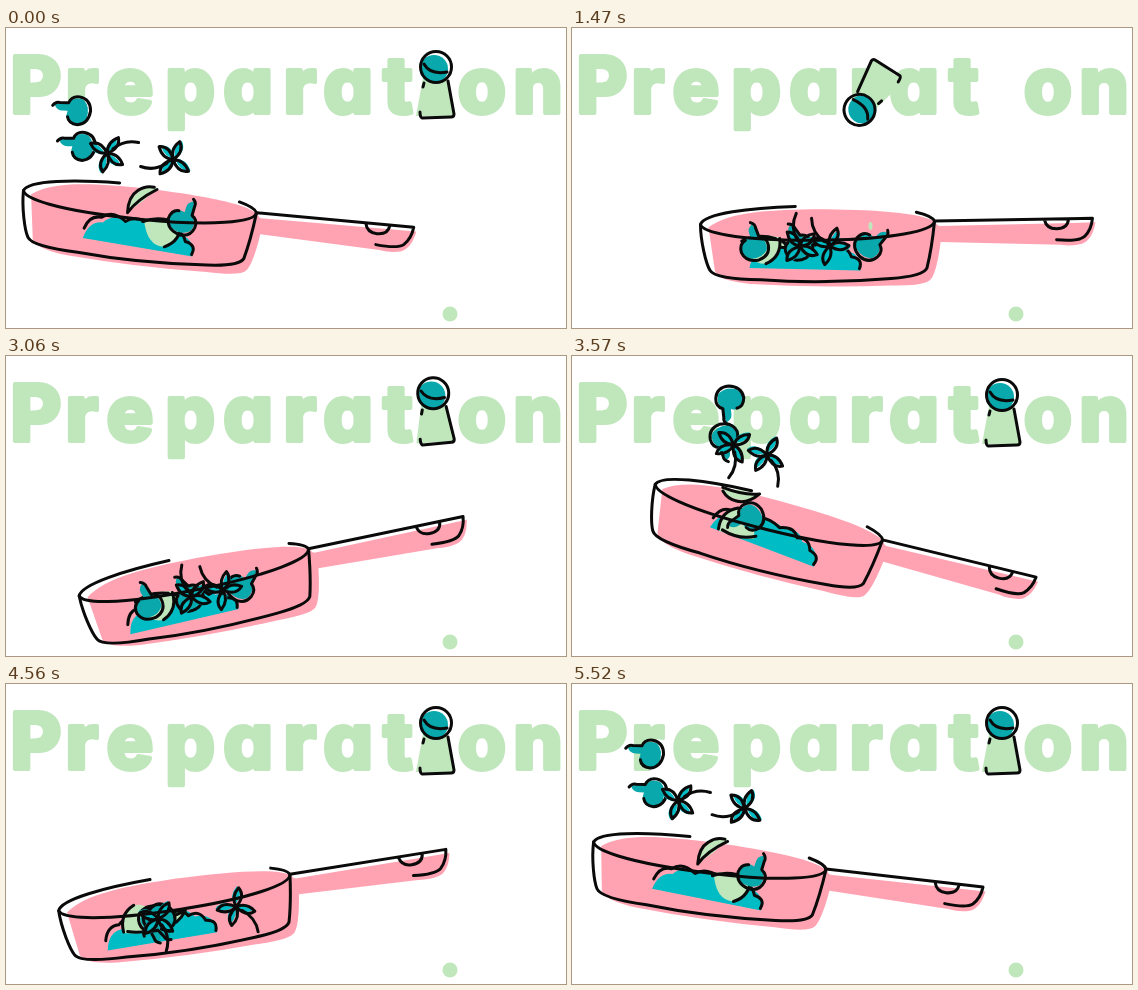
Recreate the animation shown at these times as an HTML page. Size 560x300 px, loop 5.55 s.

```html
<!DOCTYPE html>
<html lang="en">
<head>
<meta charset="utf-8">
<title>Preparation</title>
<style>
  html, body { margin: 0; width: 100%; height: 100%; overflow: hidden; background: #fff; }
  svg { display: block; width: 560px; height: 300px; }
  text {
    font: 800 78px Inter, sans-serif; font-feature-settings: "cv11";
    text-anchor: middle; fill: #c0e6bc; stroke: #c0e6bc; stroke-width: 4; stroke-linejoin: round;
  }
  .ink { fill: none; stroke: #0a0a0a; stroke-width: 3; stroke-linecap: round; stroke-linejoin: round; }
  .pink { fill: #ffa3b3; }
  .green { fill: #c0e6bc; }
  .teal { fill: #08a8ac; }
  .leaf { fill: #00bcc4; }
</style>
</head>
<body>
<svg viewBox="0 0 560 300">
  <defs>
    <g id="mushroom">
      <path class="teal" d="M-22-6Q-20 0-14 0L-9 0Q-12 8-6 13Q5 15 10 8Q14-4 7-11Q-3-15-8-7L-14-8Z"/>
      <path class="ink" d="M-24-5Q-21-9-17-8L-8-8Q-5-15 3-14Q14-12 14 0Q12 13 1 14Q-8 13-9 6"/>
    </g>
    <path id="petal" d="M0 0Q8-8 19-3Q13 6 0 0"/>
    <g id="petals">
      <use href="#petal" transform="rotate(-42)"/><use href="#petal" transform="rotate(48)"/>
      <use href="#petal" transform="rotate(115)"/><use href="#petal" transform="rotate(222)"/>
    </g>
    <g id="flower">
      <use href="#petals" class="leaf" transform="translate(-2 1)"/>
      <use href="#petals" class="ink"/>
      <path class="ink" d="M6-4Q18-13 32-9"/>
    </g>
    <g id="slice">
      <path class="green" d="M-13 16Q-12-10 14-13Q7-4 2 2Q-4 7-13 16Z"/>
      <path class="ink" d="M11-12Q2-13-5-7Q-14 0-13 16Q-5 2 14-10"/>
    </g>
    <g id="half">
      <path class="green" d="M-19-9Q0-14 18-9Q20 10 4 17Q-14 18-19-9Z"/>
      <path class="ink" d="M-20-6Q-4-14 14-8M4 17Q20 10 18-8"/>
    </g>
  </defs>

  <text y="85" x="30 76 124 184 242 294 342 392 476 532">Preparaton</text>
  <circle class="green" cx="444" cy="286" r="7.5"/>

  <g id="pan">
    <path class="pink" d="M8 4C30-12 70-13 121-13C175-12 232-8 237 4L239 5L395 3Q392 20 382 24Q372 27 360 25L240 21Q236 50 230 58Q225 65 190 64Q120 66 50 61Q18 58 14 48Z"/>
    <g id="food">
      <g id="lettuce">
        <path class="leaf" d="M-56 8Q-52-10-38-10Q-30-20-14-14Q0-22 14-14Q30-20 36-8Q56-8 55 12Z"/>
        <path class="ink" d="M-56-2Q-52-16-40-15Q-30-24-16-14Q-6-22 10-14Q24-20 30-10Q42-14 46-2Q58 0 54 10"/>
      </g>
    </g>
    <g class="ink">
      <path d="M95-16C50-15 4-10 0 1C2 8 30 18 121 18C190 18 234 10 234 0Q232-5 216-9"/>
      <path d="M0 1C0 18 5 40 9 47Q14 56 60 57Q120 62 190 57Q222 55 226 47Q231 28 234 1"/>
      <path d="M234 0L392-1Q391 10 384 17Q378 22 356 20M344 0Q346 9 356 9Q367 9 368 0"/>
    </g>
  </g>

  <ellipse id="drop" class="green" rx="2" ry="4"/>
  <g id="shaker">
    <path class="green" d="M-13 11L11 11L18 49L-20 49Z"/>
    <circle class="teal" cx="-2" cy="2" r="14"/>
    <g class="ink">
      <circle r="15.5"/>
      <path d="M-12-3Q-6 8 11 5M12 14L18 47Q18 50 15 50L-14 51Q-16 50-16 45M-12 16L-13 20"/>
    </g>
  </g>
</svg>
<script>
const LOOP = 5550, STEP = 30;
const POUR_START = 870, POUR_END = 2130, SHAKE = 210;
const DIP = 3060, REDIP = 4640, THROWN = 5520;

const $ = id => document.getElementById(id);
const clamp = (v, low, high) => Math.min(high, Math.max(low, v));
const mix = (a, b, u) => a + (b - a) * u;
const ease = (t, from, to) => {
  const u = clamp((t - from) / (to - from), 0, 1);
  return u * u * (3 - 2 * u);
};
const mod = t => ((t % LOOP) + LOOP) % LOOP;

// Smooth periodic curve through [time, values] keys, without overshoot.
function track(keys, t) {
  const n = keys.length;
  const time = i => keys[(i + n) % n][0] + Math.floor(i / n) * LOOP;
  const next = keys.findIndex(key => key[0] > t);
  const i = (next < 0 ? n : next) - 1;
  const span = time(i + 1) - time(i), u = (t - time(i)) / span, w = 1 - u;
  return keys[0][1].map((_, c) => {
    const value = k => keys[(k + n) % n][1][c];
    const slope = k => (value(k + 1) - value(k)) / (time(k + 1) - time(k));
    const tangent = k => {
      const a = slope(k - 1), b = slope(k);
      return a * b > 0 ? 2 * a * b / (a + b) : 0;
    };
    return value(i) * w * w * (1 + 2 * u) + value(i + 1) * u * u * (3 - 2 * u)
      + span * u * w * (tangent(i) * w - tangent(i + 1) * u);
  });
}

function place(node, x, y, angle) {
  node.setAttribute("transform", `translate(${x.toFixed(2)} ${y.toFixed(2)}) rotate(${angle.toFixed(2)})`);
}

const tosses = [
  { launch: 3440, apex: 3700, land: 4110 },
  { launch: 5010, apex: 5270, land: 5780 }
];

// Pan poses: left rim x, y and tilt.
const pose = {
  home: [9.5, 187, -1], pour: [127, 197.5, -1.1], poured: [129, 193, 0],
  dip: [73, 239, -11.4], windup: [45, 240, -12], fling: [84, 86.5, 23.4],
  level: [83, 168, 4.6], away: [21.7, 157, 6.9]
};
const panKeys = [
  [90, pose.home], [POUR_START, pose.pour], [POUR_END, pose.poured], [2280, pose.poured],
  [DIP, pose.dip], [3160, pose.dip],
  [tosses[0].launch, pose.fling], [tosses[0].apex, pose.level], [tosses[0].land, pose.level],
  [4740, pose.windup], [tosses[1].launch, pose.fling], [5200, pose.level], [THROWN, pose.away]
];

// Pan-local: x at rest, in the second throw (flyX) and after the first (landX).
// apex is the top of a throw; angle is the pose in the air, tumble the turn until rest.
const foods = [
  { shape: "slice", x: 62, flyX: 119, landX: 105, apex: -15, angle: 0, tumble: 40 },
  { shape: "half", x: 54, flyX: 142, landX: 79, apex: 27, angle: 0, tumble: 0 },
  { shape: "mushroom", x: 46, flyX: 45, landX: 92, apex: -130, angle: -5, tumble: 75 },
  { shape: "mushroom", x: 87, flyX: 53, landX: 97, apex: -80, angle: -5, tumble: 60 },
  { shape: "mushroom", x: 160, flyX: 161, landX: 100, apex: 12, angle: 100, tumble: 30 },
  { shape: "flower", x: 90, flyX: 79, landX: 97, apex: -74, angle: -5, tumble: -75 },
  { shape: "flower", x: 122, flyX: 146, landX: 176, apex: -74, angle: 178, tumble: 75 }
];
const FLOOR = 24;

for (const food of foods) {
  const { x, flyX, landX, angle } = food;
  const rest = angle + food.tumble, turned = rest + 180;
  const gathered = [mix(50, flyX, 0.45), turned];
  food.flingY = -5 + 0.2 * (gathered[0] - 50);
  food.keys = [
    [POUR_START, [x, rest]], [POUR_END, [x + 17, rest]], [DIP, [Math.min(x + 20, 160), rest]],
    [tosses[0].launch, gathered], [tosses[0].land, [landX, turned]], [REDIP, [landX, turned]],
    [tosses[1].launch, gathered], [THROWN, [flyX, angle]]
  ];
  food.node = document.createElementNS("http://www.w3.org/2000/svg", "use");
  food.node.setAttribute("href", "#" + food.shape);
  $("food").append(food.node);
}

// Ballistic height in a throw; otherwise on the pan floor, gathering up before a launch.
function heightOf({ apex, flingY }, t) {
  for (const toss of tosses) {
    const age = mod(t - toss.launch), rise = toss.apex - toss.launch;
    if (age < rise) return mix(apex, flingY, (1 - age / rise) ** 2);
    if (age < toss.land - toss.launch) {
      return mix(apex, FLOOR, ((age - rise) / (toss.land - toss.apex)) ** 2);
    }
  }
  const lift = Math.max(...tosses.map(({ launch }) => t < launch ? ease(t, launch - 300, launch) : 0));
  return mix(FLOOR, flingY, lift);
}

function drawShaker(t) {
  const lifted = ease(t, 250, POUR_START) - ease(t, 2200, 3150);
  const along = clamp((t - POUR_START) / (POUR_END - POUR_START), 0, 1);
  const shake = along < 1 ? 6 * Math.sin(Math.max(0, t - POUR_START) / SHAKE * 2 * Math.PI) : 0;
  const x = mix(430, mix(258, 320, along), lifted);
  const y = mix(39, mix(78, 96, along), lifted) - 40 * Math.sin(Math.PI * lifted);
  place($("shaker"), x, y + shake, mix(0, mix(-135, -147, along), lifted) + shake);

  const age = (t - POUR_START - STEP) % SHAKE;
  const falling = t > POUR_START + STEP && t < POUR_END + STEP && age < 200;
  $("drop").setAttribute("visibility", falling ? "visible" : "hidden");
  if (falling) place($("drop"), x + 11, 112 + 124 * (age / 180) ** 2, 0);
}

function draw(t) {
  const [panX, panY, tilt] = track(panKeys, t);
  place($("pan"), panX, panY, tilt);
  place($("lettuce"), 106 + clamp(tilt * 2.5, -8, 14), 37 - 1.2 * Math.max(0, tilt - 5), tilt / 3);
  for (const food of foods) {
    const [x, angle] = track(food.keys, t);
    place(food.node, x, heightOf(food, t), angle);
  }
  drawShaker(t);
}

const start = performance.now();
function tick() {
  const elapsed = performance.now() - start;
  draw(mod(Math.floor(elapsed / STEP) * STEP));
  requestAnimationFrame(tick);
}
draw(0);
requestAnimationFrame(tick);
</script>
</body>
</html>
```
